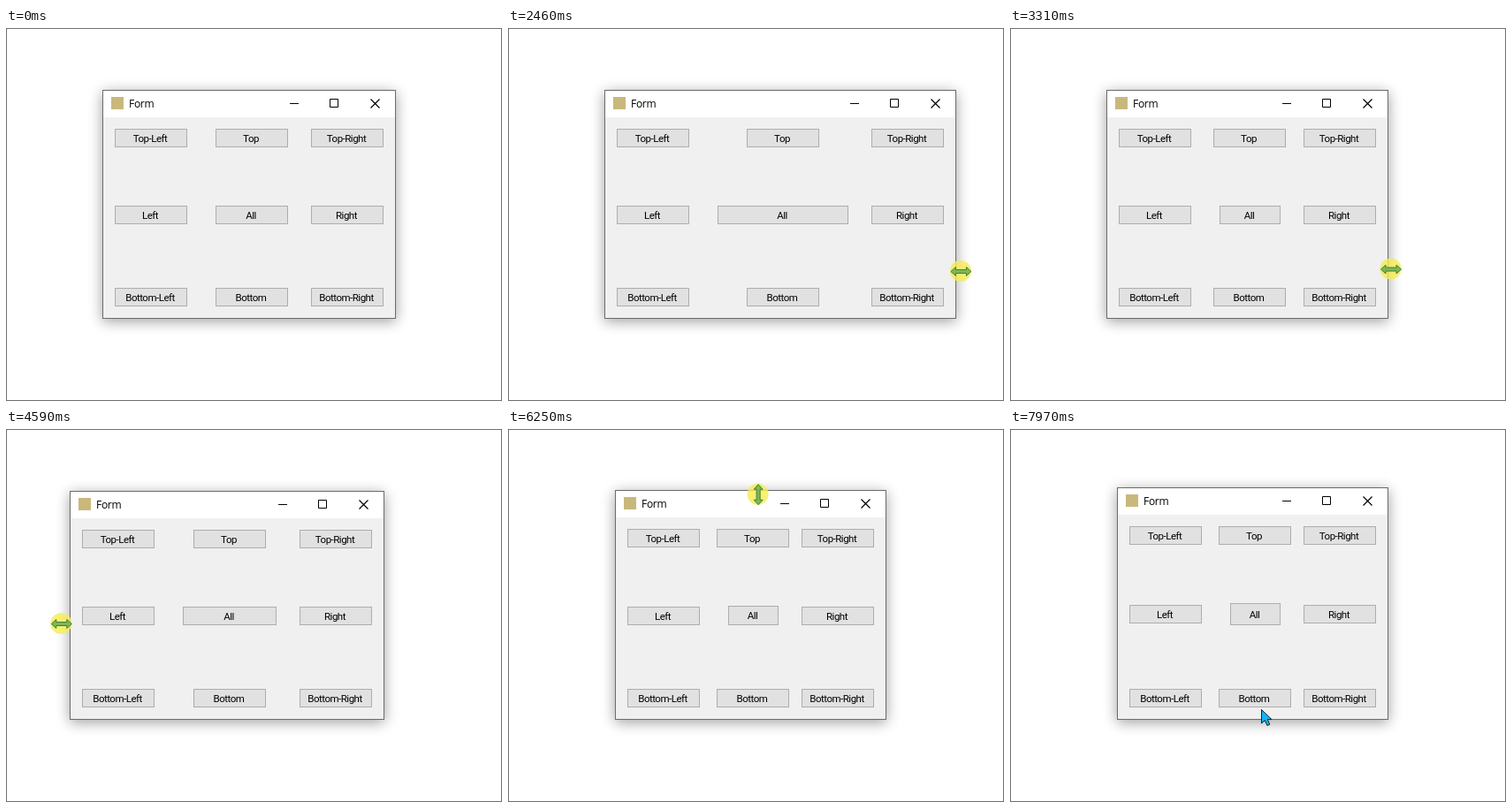
An HTML page for the animation above (8 s loop, 561 px wide and 422 px high).

```html
<!DOCTYPE html>
<html lang="en">
<head>
<meta charset="utf-8">
<title>Form</title>
<style>
  html, body { margin: 0; width: 100%; height: 100%; overflow: hidden; background: #fff; }
  svg { display: block; }
  .title { font: 12px "Open Sans", sans-serif; letter-spacing: -.3px; fill: #000; }
  .label { font: 11.5px Roboto, sans-serif; letter-spacing: -.5px; text-anchor: middle; fill: #000; }
  .btn { fill: #e1e1e1; stroke: #adadad; }
  .hover .btn { fill: #e5f1fb; stroke: #0078d7; }
  #resize, #arrow { fill: #16b4f2; stroke: #10222c; }
  .pressed #resize { fill: #7aba54; stroke: #477a33; }
</style>
</head>
<body>
<svg width="561" height="422" viewBox="0 0 561 422">
  <defs>
    <filter id="blur" filterUnits="userSpaceOnUse" x="-40" y="-40" width="640" height="500">
      <feGaussianBlur stdDeviation="8"/>
    </filter>
  </defs>
  <rect width="561" height="422" fill="#fff"/>
  <rect id="shadow" opacity=".38" filter="url(#blur)"/>
  <rect id="frame" fill="#fff" stroke="#6b6b6b"/>
  <rect id="body" fill="#f0f0f0"/>
  <g id="caption">
    <rect x="10" y="8" width="14" height="14" fill="#c9b87c"/>
    <text class="title" x="30" y="20">Form</text>
  </g>
  <g id="controls" fill="none" stroke="#000">
    <path d="M-120 15.5h10M-74.500 10.500h9v9h-9z"/>
    <path d="M-28.500 10.500l10 10m0 -10l-10 10" stroke-width="1.200"/>
  </g>
  <g id="buttons"></g>
  <g id="cursor">
    <circle id="press" cx="-.5" cy="-.5" r="12" fill="#f5ec52" opacity=".8"/>
    <path id="resize" d="M-11.500 0L-6 -5V-2H6V-5L11.500 0L6 5V2H-6V5Z"/>
    <path id="arrow" d="M.5 .5V16L4.200 12.600L7 18.500L9.800 17.200L7.200 11.600H12Z"/>
  </g>
  <rect x=".5" y=".5" width="560" height="421" fill="none" stroke="#707070"/>
</svg>
<script>
const LOOP = 8000;
const BOTTOM = 329;      // the bottom edge never moves
const LAG = 20;          // ms the window trails the pointer
const PRESS_LEAD = 90;   // ms the button is held before a drag moves
const $ = id => document.getElementById(id);

// Where each edge rests at first, which way it follows and how far off it is gripped.
const edges = {
  right: { rest: 441, axis: "x", grip: -3 },
  left: { rest: 109, axis: "x", grip: 2 },
  top: { rest: 70, axis: "y", grip: -6 }
};

const glide = (start, end, x, y) => ({ start, end, x, y });
const drag = (edge, start, end, x, y) => ({ edge, start, end, x, y });
const home = { x: 531, y: 320 };
const steps = [
  glide(200, 910, 446, 316),
  glide(1080, 1580, 444, 277.5),
  drag("right", 1910, 2620, 527, 275),
  drag("right", 2630, 3290, 431, 273),
  glide(3580, 4160, 107, 220),
  drag("left", 4440, 4760, 12, 221),
  drag("left", 4775, 5530, 119, 219),
  glide(5760, 6060, 283, 76),
  drag("top", 6220, 6790, 287, 19),
  drag("top", 6870, 7400, 287, 72),
  glide(7450, 7960, 284, 317)
];

const lerp = (a, b, k) => a + (b - a) * k;
const clamp = u => Math.min(1, Math.max(0, u));
const ease = u => lerp(u, u * u * (3 - 2 * u), .5);

function pointer(t) {
  return steps.reduce((p, s) => {
    const k = ease(clamp((t - s.start) / (s.end - s.start)));
    return { x: lerp(p.x, s.x, k), y: lerp(p.y, s.y, k) };
  }, home);
}

// An edge follows the pointer while dragged, then stays where it was left.
function edgeAt(name, t) {
  const { rest, axis, grip } = edges[name];
  const own = steps.filter(s => s.edge === name);
  const when = Math.min(t - LAG, own[own.length - 1].end);
  return when < own[0].start ? rest : Math.round(pointer(when)[axis] + grip);
}

// The edge held by the mouse; it is let go when the next glide begins.
function heldEdge(t) {
  const begun = steps.filter(s => t >= s.start - (s.edge ? PRESS_LEAD : 0));
  return begun.length ? begun[begun.length - 1].edge : undefined;
}

function set(el, attrs) {
  for (const name in attrs) el.setAttribute(name, attrs[name]);
}
const move = (el, x, y) => set(el, { transform: `translate(${x} ${y})` });
const show = (el, on) => { el.style.display = on ? "" : "none"; };
const box = (el, x, y, width, height) => set(el, { x, y, width, height });

function make(tag, cls, parent) {
  const el = document.createElementNS("http://www.w3.org/2000/svg", tag);
  if (cls) set(el, { class: cls });
  return parent.appendChild(el);
}

const names = ["Top-Left", "Top", "Top-Right", "Left", "All", "Right",
               "Bottom-Left", "Bottom", "Bottom-Right"];
const buttons = names.map((name, i) => {
  const group = make("g", "", $("buttons"));
  const rect = make("rect", "btn", group);
  const text = make("text", "label", group);
  text.textContent = name;
  return { name, group, rect, text, col: i % 3, row: Math.floor(i / 3) };
});

// Anchored layout: edges keep their margins, the middle ones stay centred.
function place(b, left, top, right) {
  if (b.name === "All") {
    return [left + 128, top + 131, right - left - 250, BOTTOM - top - 238];
  }
  const midX = left + 128 + Math.floor((right - left - 332) / 2);
  const midY = top + 131 + Math.ceil((BOTTOM - top - 259) / 2);
  return [[left + 14, midX, right - 96][b.col],
          [top + 44, midY, BOTTOM - 35][b.row], 82, 21];
}

function draw(t) {
  const left = edgeAt("left", t), top = edgeAt("top", t), right = edgeAt("right", t);
  const { x, y } = pointer(t);
  const w = right - left, h = BOTTOM - top;

  box($("shadow"), left, top + 3, w, h);
  box($("frame"), left + .5, top + .5, w - 1, h - 1);
  box($("body"), left + 1, top + 31, w - 2, h - 32);
  move($("caption"), left, top);
  move($("controls"), right, top);

  const held = heldEdge(t);
  const onSide = Math.abs(x - left) < 4 || Math.abs(x - right) < 4;
  const onTop = y >= top && y < top + 8 && x > left + 8 && x < right - 8;
  const sizing = held || onSide || onTop;
  const upright = held ? held === "top" : onTop;

  for (const b of buttons) {
    const [bx, by, bw, bh] = place(b, left, top, right);
    box(b.rect, bx + .5, by + .5, bw - 1, bh - 1);
    set(b.text, { x: bx + bw / 2 - 1, y: Math.floor(by + bh / 2 + 4.5) });
    const inside = x >= bx && x < bx + bw && y >= by && y < by + bh;
    b.group.classList.toggle("hover", inside && !sizing);
  }

  show($("cursor"), t >= steps[0].start);
  show($("press"), held);
  show($("resize"), sizing);
  show($("arrow"), !sizing);
  move($("cursor"), x, y);
  $("cursor").classList.toggle("pressed", !!held);
  set($("resize"), { transform: upright ? "rotate(90)" : "" });
}

function tick() {
  draw(performance.now() % LOOP);
  requestAnimationFrame(tick);
}
tick();
</script>
</body>
</html>
```
